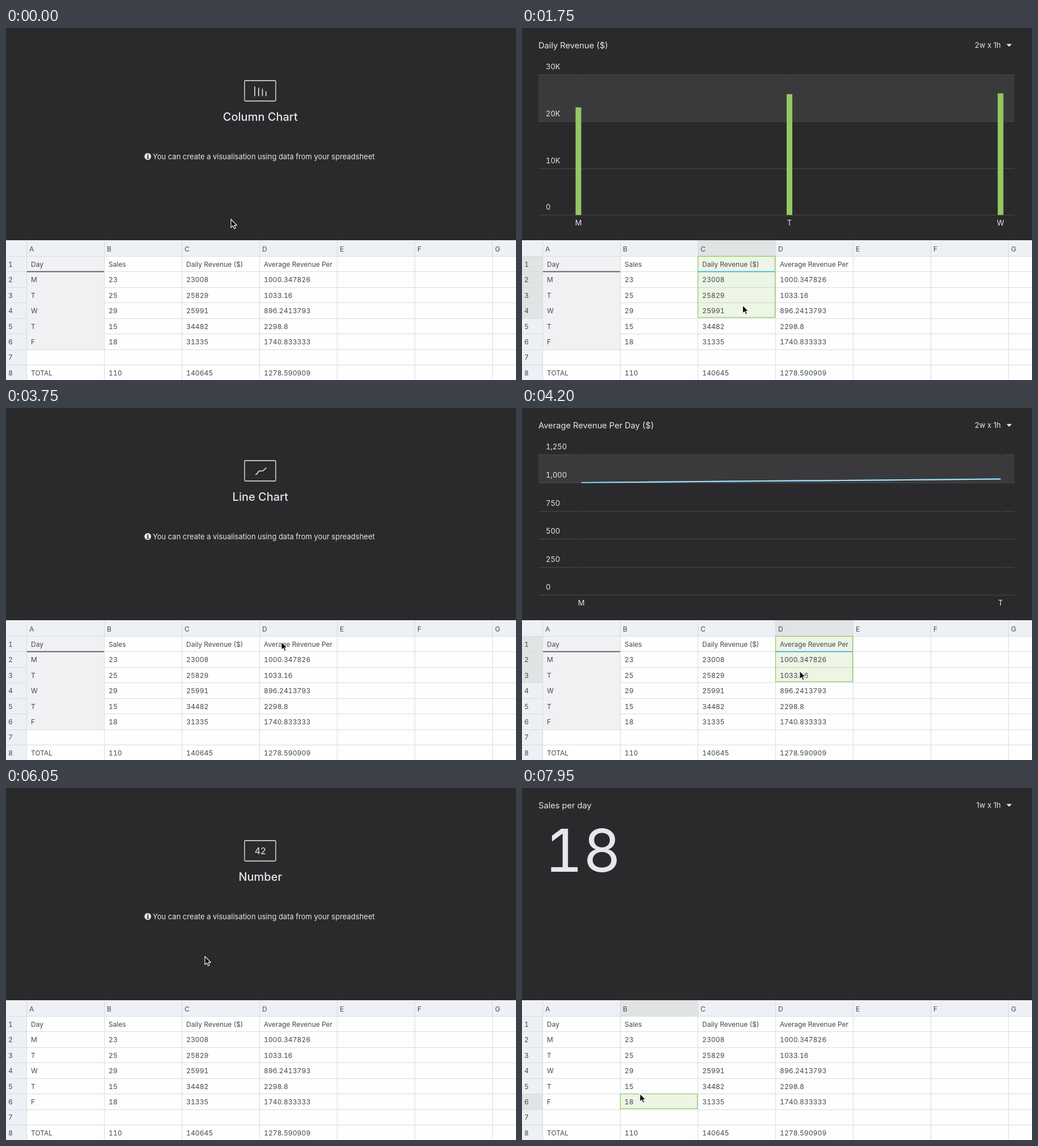
Animation, 900 px wide and 622 px high, one loop 8 s. Source, as an HTML page:

```html
<!DOCTYPE html>
<html lang="en">
<head>
<meta charset="utf-8">
<title>Spreadsheet charts</title>
<style>
  html, body { margin: 0; width: 100%; height: 100%; overflow: hidden; background: #2a2a2c; }
  svg { display: block; width: 900px; height: 622px; font-family: Inter, "Liberation Sans", sans-serif; font-variant-numeric: tabular-nums; }
  text { white-space: pre; }
  #panel text { fill: #e6e7ea; font-size: 13px; }
  #panel .name { font-size: 20px; font-weight: 500; }
  #panel .title { font-size: 14.7px; }
  #panel .icon { font-size: 16px; font-variant-numeric: normal; }
  #panel .size { font-variant-numeric: normal; }
  #panel .big { font-size: 104px; font-optical-sizing: none; }
  #cells text { fill: #454851; font-size: 12.2px; }
  #cells .head { font-size: 12px; }
</style>
</head>
<body>
<svg viewBox="0 0 900 622">
  <rect width="900" height="376" fill="#2a2a2c"/>
  <g id="panel"></g>
  <rect y="375" width="900" height="247" fill="#fefefe"/>
  <g id="back"></g>
  <g id="lines"></g>
  <g id="marks"></g>
  <g id="cells"></g>
  <path id="cursor" d="M0 0V14.6L3.4 11.5L5.7 16.7L8.2 15.6L5.9 10.6H10.4Z" fill="#0c0c0d" stroke="#fff" stroke-width="1.1" stroke-linejoin="round"/>
</svg>
<script>
const LOOP = 8000, STEP = 50;
const DARK = '#2a2a2c', BLUE = '#3cb0f7', GREEN = '#93c962';
const LEFT = 29, RIGHT = 869, TOP = 82.4, BASE = 330.4, LAST_X = 844.5;
const COL_W = 137, ROW_H = 27.45;

const table = [
  ['Day', 'Sales', 'Daily Revenue ($)', 'Average Revenue Per'],
  ['M', 23, 23008, 1000.347826],
  ['T', 25, 25829, 1033.16],
  ['W', 29, 25991, 896.2413793],
  ['T', 15, 34482, 2298.8],
  ['F', 18, 31335, 1740.833333],
  [],
  ['TOTAL', 110, 140645, 1278.590909]
];

// time, x, y of the pointer tip; a fourth value eases the move towards that point
const path = [
  [0, 397, 338], [500, 397, 338], [1050, 384, 415.5, 1], [1250, 384, 415.5],
  [1350, 384, 430], [2100, 394, 542], [2250, 395.5, 546], [2899, 395.5, 546],
  [2900, 420, 328], [3250, 420, 328], [3750, 486, 413, 1], [3900, 486, 413],
  [4100, 489, 451], [4800, 495.5, 546], [6049, 495.5, 546],
  [6050, 351, 297.5], [6800, 351, 297.5], [7250, 225, 547, 1], [7900, 225, 547],
  [7950, 208, 540], [LOOP, 208, 540]
];

const scenes = [
  { from: 0, kind: 'column', name: 'Column Chart', col: 2, press: 1150, title: 'Daily Revenue ($)', x0: 99.5 },
  { from: 2900, kind: 'line', name: 'Line Chart', col: 3, press: 3850, title: 'Average Revenue Per Day ($)', x0: 104.5 },
  { from: 6050, kind: 'number', name: 'Number', col: 1, press: 7600, title: 'Sales per day' }
];

const $ = id => document.getElementById(id);
const colX = c => 36 + COL_W * c;
const rowY = r => Math.round(403 + ROW_H * (r - 1));
const rect = (x, y, w, h, fill, more = '') =>
  `<rect x="${x}" y="${y}" width="${w}" height="${h}" fill="${fill}" ${more}/>`;
const text = (x, y, s, cls = '', anchor = 'start') =>
  `<text x="${x}" y="${y}" class="${cls}" text-anchor="${anchor}">${s}</text>`;
const stroke = (d, color, w, more = '') =>
  `<path d="${d}" fill="none" stroke="${color}" stroke-width="${w}" ${more}/>`;

function pointer(t) {
  const i = path.findIndex(p => p[0] > t);
  const [t0, x0, y0] = path[i - 1], [t1, x1, y1, ease] = path[i];
  let k = (t - t0) / (t1 - t0);
  if (ease) k = (1 - Math.cos(Math.PI * k)) / 2;
  return [x0 + (x1 - x0) * k, y0 + (y1 - y0) * k];
}

function placeholder({ kind, name }) {
  const white = '#eeeff1';
  const icons = {
    column: stroke('M439 103.5V120.5M445.8 105.5V120.5M452.5 107.5V120.5M458.7 112V120.5', white, 1.5),
    line: stroke('M440 117.5L442 117.3L446.5 111.5L453.5 111L459.5 105.5', white, 1.5, 'stroke-linejoin="round"'),
    number: text(448.8, 117, '42', 'icon', 'middle')
  };
  return rect(421, 93, 55, 36, 'none', `rx="1.5" stroke="${white}" stroke-width="1.3"`) + icons[kind] +
    text(448.8, 164, name, 'name', 'middle') +
    `<circle cx="250.2" cy="227" r="5.9" fill="${white}"/>` +
    stroke('M250.5 223V224.8', DARK, 2) +
    stroke('M248.6 226.4H250.5V230.2M248.5 230.2H252.3', DARK, 1.6) +
    text(259, 231.7, 'You can create a visualisation using data from your spreadsheet');
}

function tickStep(max) {
  const raw = max * 72 / (BASE - TOP), mag = 10 ** Math.floor(Math.log10(raw));
  const sizes = [1, 2, 2.5, 5, 10];
  const i = sizes.findIndex((s, n) => n === 4 || raw / mag <= (s + sizes[n + 1]) / 2);
  return sizes[i] * mag;
}

function chart({ kind, col, x0 }, count) {
  const rows = table.slice(1, 1 + count), values = rows.map(r => r[col]);
  const max = Math.max(...values), step = tickStep(max), n = Math.ceil(max / step);
  const y = v => BASE - (BASE - TOP) * v / (n * step);
  const xs = values.map((_, i) => count > 1 ? x0 + (LAST_X - x0) * i / (count - 1) : (x0 + LAST_X) / 2);
  const limit = (n - 1) * step, bandH = y(limit) - TOP;
  let out = rect(LEFT, TOP, RIGHT - LEFT, bandH, '#3a3a3c');
  for (let i = 0; i <= n; i++) {
    const v = i * step, ly = Math.round(y(v)) + .5;
    const label = kind === 'column' && v ? v / 1000 + 'K' : v.toLocaleString('en-US');
    out += stroke(`M${LEFT} ${ly}H${RIGHT}`, '#48484a', 1);
    if (i) out += xs.map(x => rect(x - 1.3, ly - .8, 2.6, 1.6, DARK)).join('');
    out += text(42, y(v) - 9, label);
  }
  out += xs.map((x, i) => text(x, 349, rows[i][0], '', 'middle')).join('');
  if (kind === 'column') {
    return out + xs.map((x, i) =>
      rect(x - 5, y(values[i]), 10, BASE - y(values[i]), values[i] > limit ? GREEN : BLUE)).join('');
  }
  const d = 'M' + xs.map((x, i) => `${x} ${y(values[i])}`).join('L');
  return out + stroke(d, BLUE, 2, 'stroke-linejoin="round"') +
    `<clipPath id="band">${rect(LEFT, TOP, RIGHT - LEFT, bandH, DARK)}</clipPath>` +
    stroke(d, '#a6def9', 2, 'clip-path="url(#band)" stroke-linejoin="round"');
}

function panel(scene, first, last) {
  const number = scene.kind === 'number';
  if (!last || (!number && last < 2)) return placeholder(scene);
  return text(29, 36, scene.title, 'title') +
    text(845, 35, number ? '1w x 1h' : '2w x 1h', 'size', 'end') +
    '<path d="M855 28.2H864.4L859.7 33Z" fill="#eeeff1"/>' +
    (number ? text(40, 147.5, table[5][1], 'big') : chart(scene, last - 1));
}

function headers({ col }, first, last) {
  let out = rect(0, 375, 900, 28, '#edf1f5') + rect(0, 403, 36, 219, '#edf1f5');
  if (last) {
    const on = '#e0e4e4';
    out += rect(colX(col), 375, COL_W, 28, on) +
      rect(0, rowY(first), 36, rowY(last + 1) - rowY(first), on);
  }
  return out;
}

function marks({ kind, col }, first, last) {
  let out = '';
  if (kind !== 'number') {
    out += rect(37, 404, 136, 164, '#f1f1f4') + rect(37, 429.6, 136, 1.8, '#55565b');
  }
  if (!last) return out;
  const x = colX(col) + .5, y = rowY(first) + .5;
  const h = rowY(last + 1) - rowY(first) - 2;
  out += rect(x, y, COL_W - 1, h, 'rgba(147,201,98,.16)', 'stroke="#8cc65c" stroke-width="1.2"');
  if (kind !== 'number') out += rect(x + .5, 429.6, COL_W - 2, 1.8, '#41b1e6');
  return out;
}

function buildGrid() {
  let d = '', s = '';
  for (let c = 0; c < 7; c++) {
    d += `M${colX(c) + .5} 376V622`;
    s += text(colX(c) + 5, 394.5, 'ABCDEFG'[c]);
  }
  table.forEach((row, r) => {
    const y = 421.7 + ROW_H * r;
    d += `M0 ${rowY(r + 1) + .5}H900`;
    s += text(4, y, r + 1);
    row.forEach((v, c) => { s += text(colX(c) + 8, y, v, r && c ? '' : 'head'); });
  });
  $('lines').innerHTML = stroke(d, '#d9dbdc', 1);
  $('cells').innerHTML = s;
}

let shown = '';
function draw(now) {
  const t = Math.floor((now % LOOP) / STEP) * STEP;
  const [x, y] = pointer(t);
  const scene = scenes.filter(s => s.from <= t).pop();
  let first = 0, last = 0;
  if (t >= scene.press) {
    last = Math.max(1, Math.min(6, Math.floor((y - 403) / ROW_H) + 1));
    first = 1;
    if (scene.kind === 'number') first = last = 6;
  }
  $('cursor').setAttribute('transform', `translate(${x} ${y})`);
  const key = scene.kind + last;
  if (key !== shown) {
    shown = key;
    $('panel').innerHTML = panel(scene, first, last);
    $('back').innerHTML = headers(scene, first, last);
    $('marks').innerHTML = marks(scene, first, last);
  }
}

buildGrid();
const start = performance.now();
function tick() {
  draw(performance.now() - start);
  requestAnimationFrame(tick);
}
tick();
</script>
</body>
</html>
```
